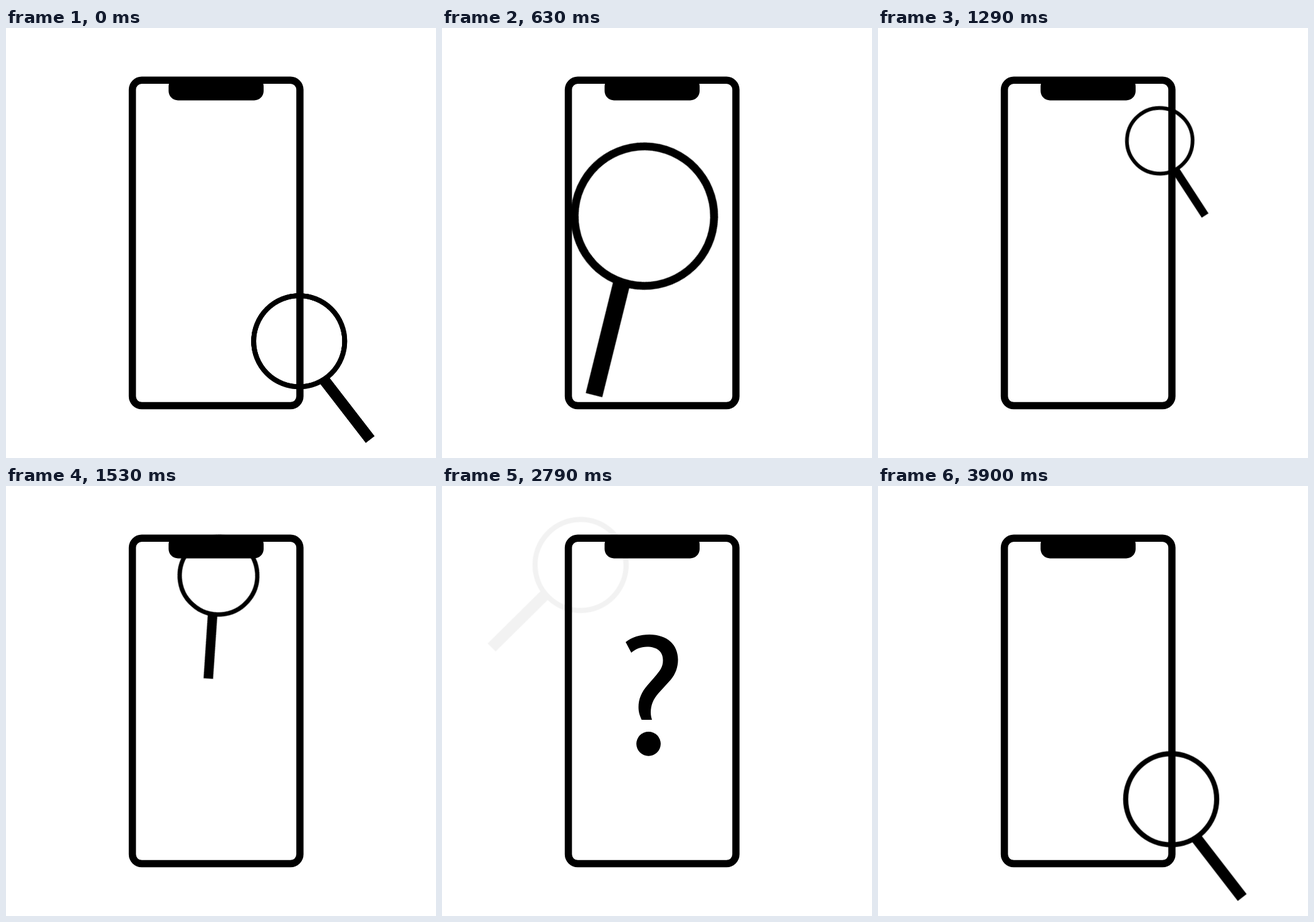
These frames come from a looping animation (686x686 px, 4620 ms). An HTML page:

```html
<!DOCTYPE html>
<html lang="en">
<head>
<meta charset="utf-8">
<title>Phone search</title>
<style>
  html, body { margin: 0; width: 100%; height: 100%; overflow: hidden; background: #fff; }
  svg { display: block; width: 100%; height: 100%; }

  /* The loop is 154 ticks of 30 ms; every move advances once per tick. */
  .lens, .question { animation: 4620ms linear -4ms infinite; }
  .lens { animation-name: search, lens-fade; transform-origin: 0 0; }
  .question { animation-name: question-fade; }

  @keyframes search {
    0%        { transform: translate(498.2px, 546.7px) rotate(0deg) scale(1); animation-timing-function: steps(9); }
    5.84416%  { transform: translate(208.9px, 455.7px) rotate(75deg) scale(1.91); }
    10.38961% { transform: translate(208.9px, 455.7px) rotate(75deg) scale(1.91); animation-timing-function: steps(16); }
    20.77922% { transform: translate(485.8px, 218.6px) rotate(0deg) scale(.705); }
    27.27273% { transform: translate(485.8px, 218.6px) rotate(0deg) scale(.705); animation-timing-function: steps(18); }
    38.96104% { transform: translate(178.1px, 162px) rotate(83deg) scale(1); animation-timing-function: step-end; }
    64.93506%, 100% { transform: translate(498.2px, 546.7px) rotate(0deg) scale(1); }
  }

  @keyframes lens-fade {
    0%        { opacity: 1; }
    48.7013%  { opacity: 1; animation-timing-function: steps(19); }
    61.03896% { opacity: 0; }
    78.57143% { opacity: 0; animation-timing-function: steps(9); }
    84.41558%, 100% { opacity: 1; }
  }

  @keyframes question-fade {
    0%        { opacity: 0; }
    54.54545% { opacity: 0; animation-timing-function: steps(9); }
    60.38961% { opacity: 1; }
    78.57143% { opacity: 1; animation-timing-function: steps(9); }
    84.41558%, 100% { opacity: 0; }
  }
</style>
</head>
<body>
<svg viewBox="0 0 686 686">
  <g class="lens" fill="none" stroke="#000">
    <circle cx="-30.5" cy="-47" r="72.6" stroke-width="8.2"/>
    <path d="M9.8 15.3L82.8 109.8" stroke-width="17.8"/>
  </g>

  <g class="phone">
    <rect x="201.6" y="83.3" width="267.3" height="519.3" rx="15" fill="none" stroke="#000" stroke-width="11.5"/>
    <rect x="259.4" y="78" width="151.6" height="37.5" rx="15"/>
  </g>

  <g class="question" role="img" aria-label="?">
    <path d="M293 249C303 241 316 237 331 237C359 237 376.5 253 376.5 277C376.5 289 372.5 300 365 309L345 331C337 340 333 350 333 361C333 366 334 370 335 373H318.5C315.5 366 313.5 361 313.5 353C313.5 340 318 329 328.5 317L339 305C347.5 295 352.5 289 352.5 278C352.5 264 343 256.5 327 256.5C317 256.5 309 260 302 266Z"/>
    <circle cx="329.5" cy="411.3" r="19.4"/>
  </g>
</svg>
</body>
</html>
```
